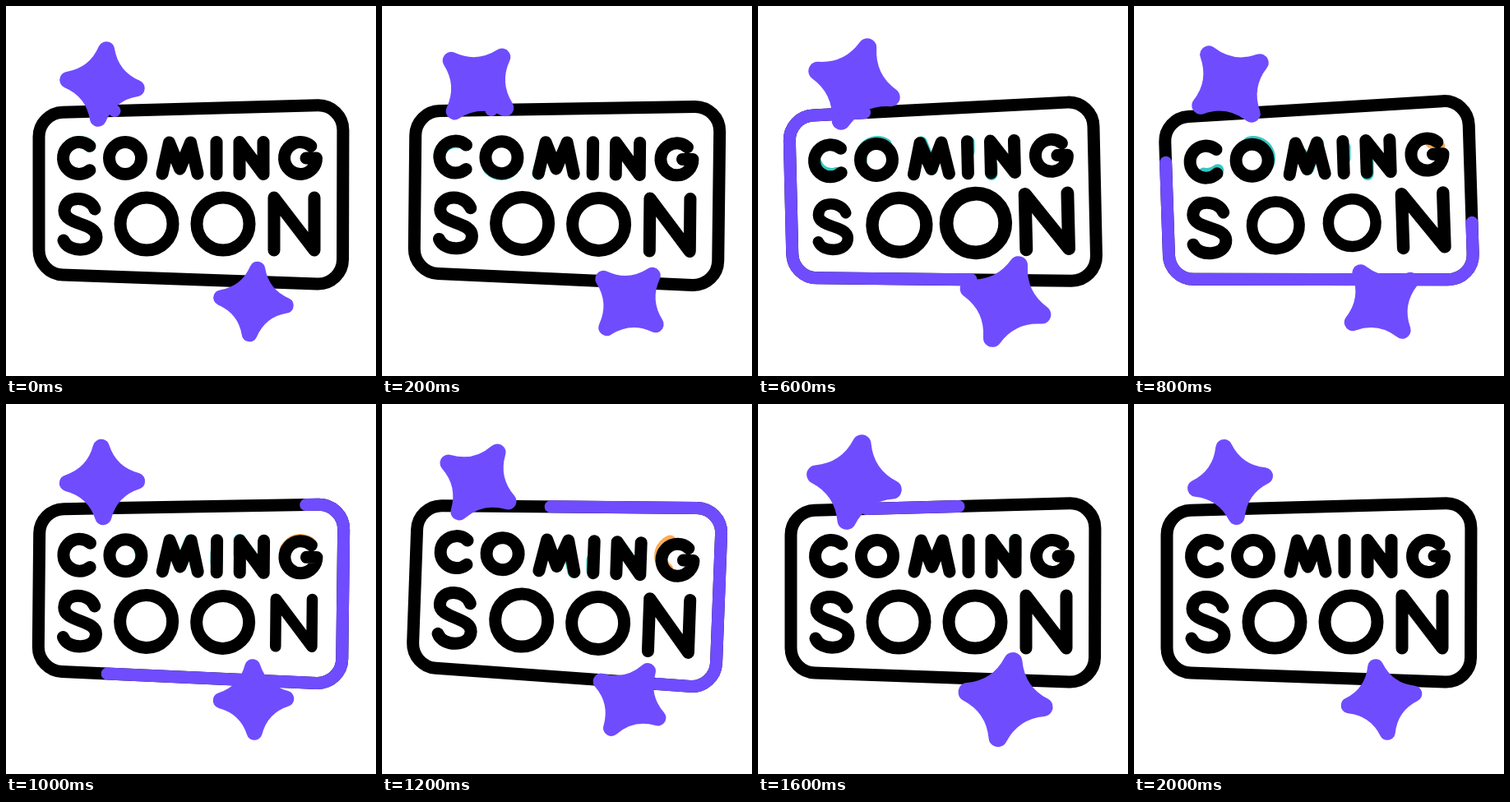
Recreate the animation shown at these times as an HTML page with a canvas. Size 450 px wide and 450 px high, loop 2.1 s.

```html
<!DOCTYPE html>
<html lang="en">
<head>
<meta charset="utf-8">
<title>Coming soon</title>
<style>
html, body { margin: 0; width: 100%; height: 100%; overflow: hidden; background: #fff; }
canvas { display: block; }
</style>
</head>
<body>
<canvas id="stage" width="450" height="450" role="img" aria-label="Coming soon"></canvas>
<script>
const ctx = document.getElementById('stage').getContext('2d');
const LOOP = 2100, STEP = 100, TAU = Math.PI * 2;
const INK = '#000', PURPLE = '#704cff', TEAL = '#35c8c0', ORANGE = '#ffab55';

const clamp = v => Math.min(1, Math.max(0, v));
const ease = k => (1 - Math.cos(Math.PI * k)) / 2;

// The sign rocks through these times and amounts
const rocking = [[100, 0], [400, 1], [690, -1.04], [1200, .88], [1560, 0]];

function tiltAt(t) {
  for (let i = 1; i < rocking.length; i++) {
    const [t0, a] = rocking[i - 1], [t1, b] = rocking[i];
    if (t < t1) return .041 * (a + (b - a) * ease(clamp((t - t0) / (t1 - t0))));
  }
  return 0;
}

function headAt(t) {
  const x = clamp((t - 200) / 1090);
  return x + .075 * Math.sin(Math.PI * x);
}

const tailAt = t => clamp((t - 675) / 1030);

function line(...p) {
  ctx.moveTo(p[0], p[1]);
  for (let i = 2; i < p.length; i += 2) ctx.lineTo(p[i], p[i + 1]);
}

function ring(r) {
  ctx.moveTo(r * Math.SQRT1_2, r * Math.SQRT1_2);
  ctx.arc(0, 0, r, TAU / 8, TAU * 9 / 8);
}

// Letters are drawn around their own centres; len is the stroke length
const top6 = [
  { x: 89, len: 89, path: () => ctx.arc(0, 0, 19.5, -.85, .85, true) },
  { x: 145, len: 122, path: () => ring(19.5) },
  { x: 211.5, len: 147, path: () => line(-21.5, 19, -13, -19, 0, 13, 13, -19, 21.5, 19) },
  { x: 256, len: 39, path: () => line(0, -19.5, 0, 19.5) },
  { x: 298.5, len: 127, path: () => line(-14.5, 19.5, -14.5, -19.5, 14.5, 19.5, 14.5, -19.5) },
  { x: 358, len: 118, path: () => { ctx.arc(0, 0, 19.5, -.85, 0, true); ctx.lineTo(7, 0); } }
];

function curveS() {
  ctx.moveTo(18, -18);
  ctx.bezierCurveTo(12, -34, -18, -36, -19, -16);
  ctx.bezierCurveTo(-19, 2, 20, -2, 20, 16);
  ctx.bezierCurveTo(20, 35, -14, 36, -20, 20);
}

const bottom4 = [
  { x: 90, path: curveS },
  { x: 171, path: () => ring(32) },
  { x: 264, path: () => ring(32) },
  { x: 350.5, path: () => line(-24.5, 32, -24.5, -32, 24.5, 32, 24.5, -32) }
];

function letter({ x, path }, y, color, scale = 1) {
  ctx.save();
  ctx.translate(x, y);
  ctx.scale(scale, scale);
  ctx.strokeStyle = color;
  ctx.beginPath();
  path();
  ctx.stroke();
  ctx.restore();
}

// Strokes the part between two fractions of a path
function trimmed(from, to, len, stroke) {
  if (to < from || from >= 1) return;
  ctx.setLineDash([Math.max(.01, (to - from) * len), len * 2]);
  ctx.lineDashOffset = -from * len;
  stroke();
  ctx.setLineDash([]);
}

// Coloured strokes run along each letter in turn and do not rock with the sign
function echoes(t) {
  top6.forEach((l, i) => {
    const p = (t + 50 - 190 * i) / 900;
    trimmed(clamp(p - .15), clamp(p + .2), l.len, () => {
      if (p > -.2) letter(l, 185, i === 5 ? ORANGE : TEAL);
    });
  });
}

// Each large letter swells, then shrinks, one after the other
function swell(t, i) {
  return 1 + .12 * Math.sin(TAU * clamp((t - 260 - 100 * i) / 520));
}

function frame(head, tail) {
  const R = 30, start = [132, 127.5];
  const corners = [[40, 130], [40, 326], [409.5, 339], [410, 120]];
  const around = corners.reduce((sum, p, i) => {
    const q = corners[(i + 1) % 4];
    return sum + Math.hypot(q[0] - p[0], q[1] - p[1]);
  }, 0) - R * (8 - TAU);
  ctx.beginPath();
  ctx.moveTo(...start);
  corners.forEach((p, i) => ctx.arcTo(...p, ...(corners[i + 1] || start), R));
  ctx.lineTo(...start);
  ctx.strokeStyle = INK;
  ctx.stroke();
  ctx.strokeStyle = PURPLE;
  trimmed(tail, head, around, () => ctx.stroke());
}

function star(x, y, r, turn) {
  const flare = .285;
  ctx.save();
  ctx.translate(x, y);
  ctx.rotate(turn);
  ctx.beginPath();
  for (let i = 0; i < 4; i++) {
    ctx.arc(0, -r, .24 * r, Math.PI + flare, -flare);
    ctx.quadraticCurveTo(.42 * r, -.42 * r, 1.067 * r, -.23 * r);
    ctx.rotate(TAU / 4);
  }
  ctx.fillStyle = PURPLE;
  ctx.fill();
  ctx.restore();
}

function rocked(tilt, paint) {
  ctx.save();
  ctx.translate(225, 228);
  ctx.rotate(tilt);
  ctx.translate(-225, -228);
  paint();
  ctx.restore();
}

function draw(t) {
  const tilt = tiltAt(t);
  ctx.fillStyle = '#fff';
  ctx.fillRect(0, 0, 450, 450);
  ctx.lineWidth = 15;
  ctx.lineCap = ctx.lineJoin = 'round';
  echoes(t);
  rocked(tilt, () => {
    frame(headAt(t), tailAt(t));
    top6.forEach(l => letter(l, 185, INK));
    bottom4.forEach((l, i) => letter(l, 265, INK, swell(t, i)));
  });
  // One full turn and two size pulses in each loop
  const phase = TAU * t / LOOP, pulse = Math.cos(2 * phase), turn = phase + .12;
  star(117, 95, 44.7 - 2.7 * pulse, turn);
  star(301, 359.5, 43.4 - 3.8 * pulse, turn);
}

function tick() {
  draw(Math.floor(performance.now() % LOOP / STEP) * STEP);
  requestAnimationFrame(tick);
}
tick();
</script>
</body>
</html>
```
